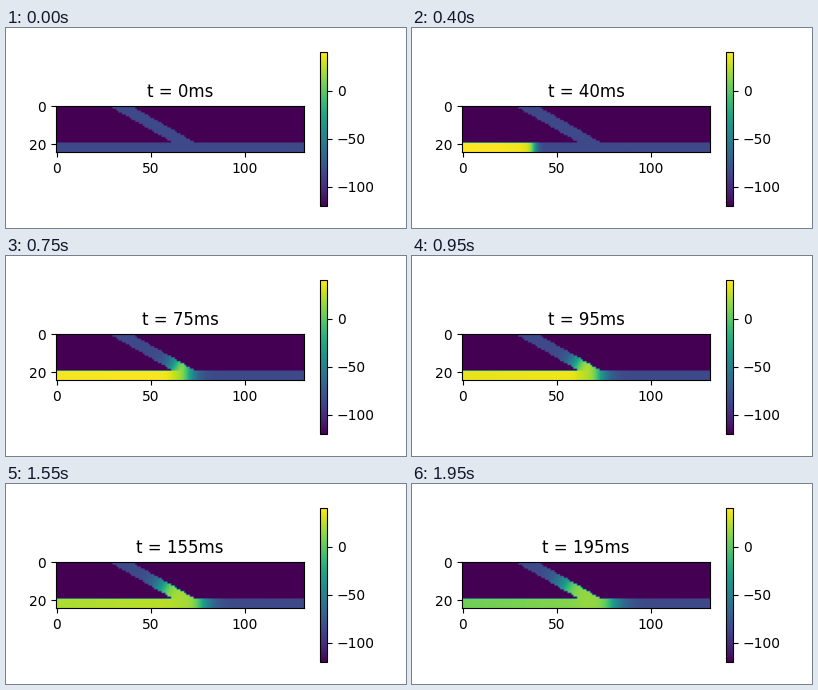
A matplotlib script for the animation above (2000 ms loop, 400 by 200 pixels).

```python
import numpy as np
import matplotlib.pyplot as plt
from matplotlib.animation import FuncAnimation

ROWS, COLS = 25, 132
REST, OUTSIDE = -85, -120
FRAMES, STEP = 40, 5       # STEP: simulated ms per frame
JUNCTION, ARRIVAL = 66, 60  # column of the fork, time the wave gets there
SPEED = 1.4                # columns per ms

y, x = np.mgrid[:ROWS, :COLS].astype(float)
cable = y >= 20
branch = ~cable & (np.abs(x - 33.6 - np.sqrt(3) * y) <= 5.9)
tissue = cable | branch

# distance past the junction, to the right or up the branch
ahead_x = x - JUNCTION
up = -(ahead_x * np.cos(np.pi / 6) + (y - 18.7) * np.sin(np.pi / 6))
dist = np.where(cable, ahead_x, np.maximum(ahead_x, up))


def sigmoid(u):
    return 1 / (1 + np.exp(-np.clip(u, -60, 60)))


at_junction = np.where(cable, sigmoid((x - 61) / 1.5), 1)


def voltage(t):
    # steady run along the cable, then slow diffusion past the junction
    late = max(t - ARRIVAL, 0)
    front = SPEED * min(t - ARRIVAL, 0) + 1.2 * np.sqrt(late)
    width = 1.2 + 1.4 * sigmoid((t - 55) / 2) + 0.01 * late
    sharp = 0.65 + 0.35 * np.exp(-late / 15)

    age = np.maximum(t - ARRIVAL - ahead_x / SPEED, 0)
    plateau = 42 - 3.35e-4 * np.maximum(t - 0.2 * x, 0) ** 2.2
    plateau -= 10 * np.exp(-age / 8)
    junction = 25 - 10 * (t / 195) ** 3
    peak = plateau + (junction - plateau) * at_junction

    behind = front - dist
    rise = sigmoid(behind / np.where(behind > 0, width * sharp, width))
    return np.where(tissue, REST + (peak - REST) * rise, OUTSIDE)


fig, ax = plt.subplots(figsize=(4, 2), dpi=100)
image = ax.imshow(voltage(0), vmin=-120, vmax=40, cmap="viridis")
fig.colorbar(image, ax=ax)
title = ax.set_title("t = 0ms")


def update(i):
    t = i * STEP
    image.set_data(voltage(t))
    title.set_text(f"t = {t}ms")
    return image, title


anim = FuncAnimation(fig, update, frames=FRAMES, interval=50,
                     repeat=True, repeat_delay=0)
plt.show()
```
